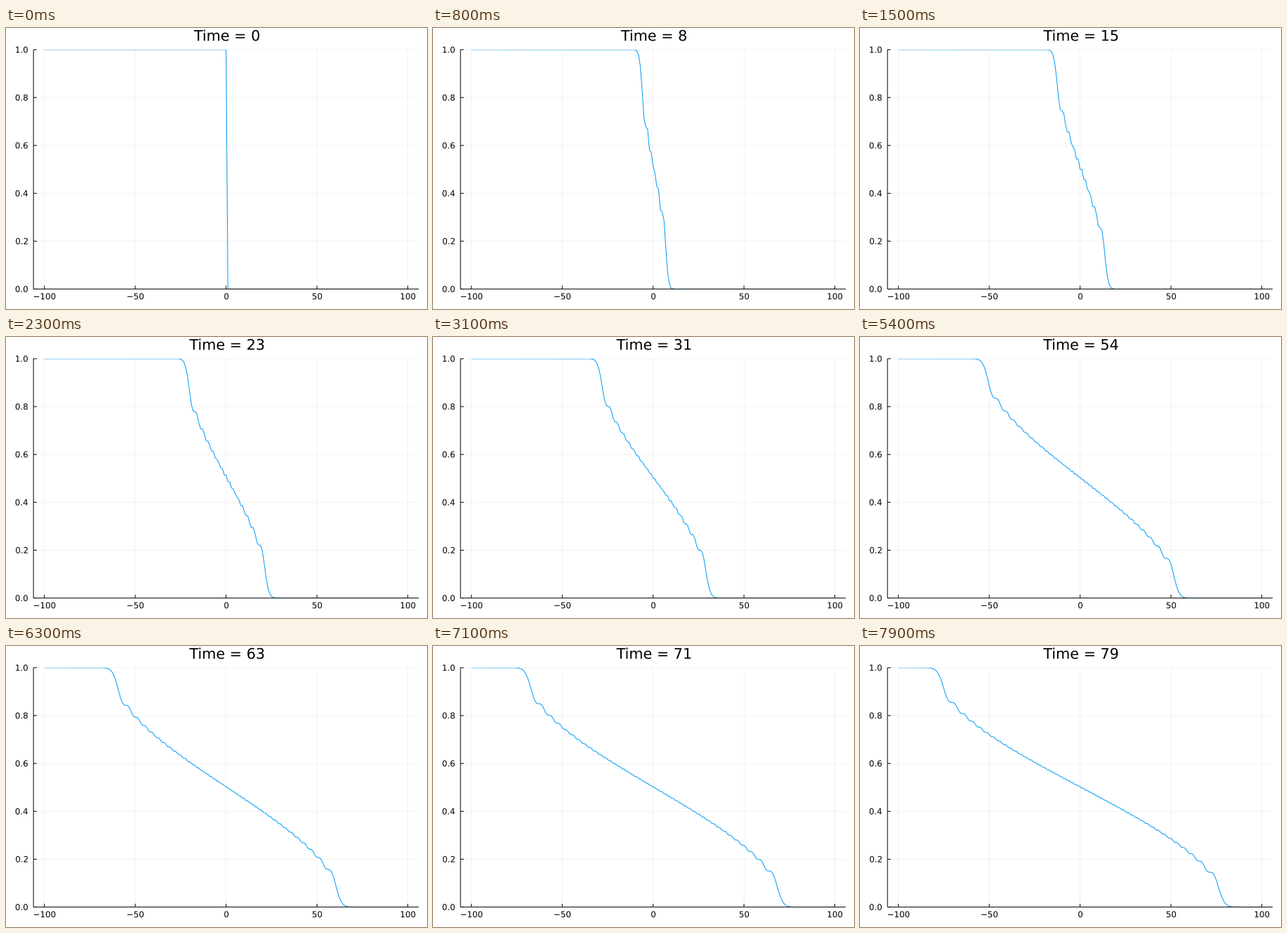
A matplotlib script that plays this animation: 600x400 px, repeating every 8000 ms.

```python
import numpy as np
import matplotlib.pyplot as plt
from matplotlib.animation import FuncAnimation
from matplotlib.patches import PathPatch, Rectangle
from matplotlib.path import Path
from matplotlib.textpath import TextPath

W, H, DPI = 600, 400, 100
STEPS, INTERVAL = 80, 100
LEFT, RIGHT, TOP, BOTTOM = 39.15, 588.19, 30.87, 371.61
TICK, TICK_SIZE, TITLE_SIZE = 4.72, 11.85, 20.74
SITES = np.arange(-100, 101)
MODES = 512


def to_x(site):
    return LEFT + (RIGHT - LEFT) * (site + 106) / 212


def to_y(density):
    return BOTTOM - (BOTTOM - TOP) * density


def profile(t):
    """Density of a melting domain wall: sum of J_k(t)^2 over k >= x."""
    theta = 2 * np.pi * np.arange(MODES) / MODES
    bessel = np.fft.fftshift(np.fft.fft(np.exp(1j * t * np.sin(theta)))) / MODES
    tail = np.cumsum(np.abs(bessel[::-1]) ** 2)[::-1]
    return tail[SITES + MODES // 2]


def line(xs, ys, color="black", width=1.0, **kw):
    return stage.plot(xs, ys, color=color, linewidth=width * 72 / DPI,
                      snap=False, solid_capstyle="butt", **kw)[0]


def text_path(x, baseline, s, size, align):
    """Glyph outlines, with the inked width aligned by a fraction of itself."""
    glyphs = TextPath((0, 0), s, size=size)
    box = glyphs.get_extents()
    shift = [x - box.x0 - align * box.width, baseline]
    return Path(glyphs.vertices * [1, -1] + shift, glyphs.codes)


def label(path):
    return stage.add_patch(PathPatch(path, facecolor="black", linewidth=0,
                                     snap=False, zorder=4))


def title_path(t):
    x = (LEFT + RIGHT) / 2 + 0.035 * TITLE_SIZE
    return text_path(x, 18.14, f"Time = {t}", TITLE_SIZE, 0.5)


plt.rcParams["font.family"] = "DejaVu Sans"
plt.rcParams["toolbar"] = "None"

# One drawing area in pixel units, y pointing down
fig = plt.figure(figsize=(W / DPI, H / DPI), dpi=DPI, facecolor="white")
stage = fig.add_axes([0, 0, 1, 1])
stage.set(xlim=(0, W), ylim=(H, 0))
stage.axis("off")

for site in range(-100, 101, 50):
    x = to_x(site)
    line([x, x], [BOTTOM, TOP], width=0.5, alpha=0.1, zorder=1)
    line([x, x], [BOTTOM, BOTTOM - TICK], zorder=3)
    name = str(site).replace("-", "\u2212")
    label(text_path(x + 0.035 * TICK_SIZE, 386.23, name, TICK_SIZE, 0.5))

for density in np.linspace(0, 1, 6):
    y = to_y(density)
    line([LEFT, RIGHT], [y, y], width=0.5, alpha=0.1, zorder=1)
    line([LEFT, LEFT + TICK], [y, y], zorder=3)
    label(text_path(30.9, y + 0.3645 * TICK_SIZE, f"{density:.1f}", TICK_SIZE, 1))

line([LEFT, RIGHT], [BOTTOM, BOTTOM], zorder=3)
line([LEFT, LEFT], [BOTTOM, TOP], zorder=3)

curve = line(to_x(SITES), to_y(profile(0)), color="#009AFA", zorder=2)
curve.set_clip_path(Rectangle((LEFT, TOP), RIGHT - LEFT, BOTTOM - TOP,
                              transform=stage.transData))
title = label(title_path(0))


def update(t):
    curve.set_ydata(to_y(profile(t)))
    title.set_path(title_path(t))
    return curve, title


anim = FuncAnimation(fig, update, frames=STEPS, interval=INTERVAL,
                     repeat=True, repeat_delay=0)
plt.show()
```
